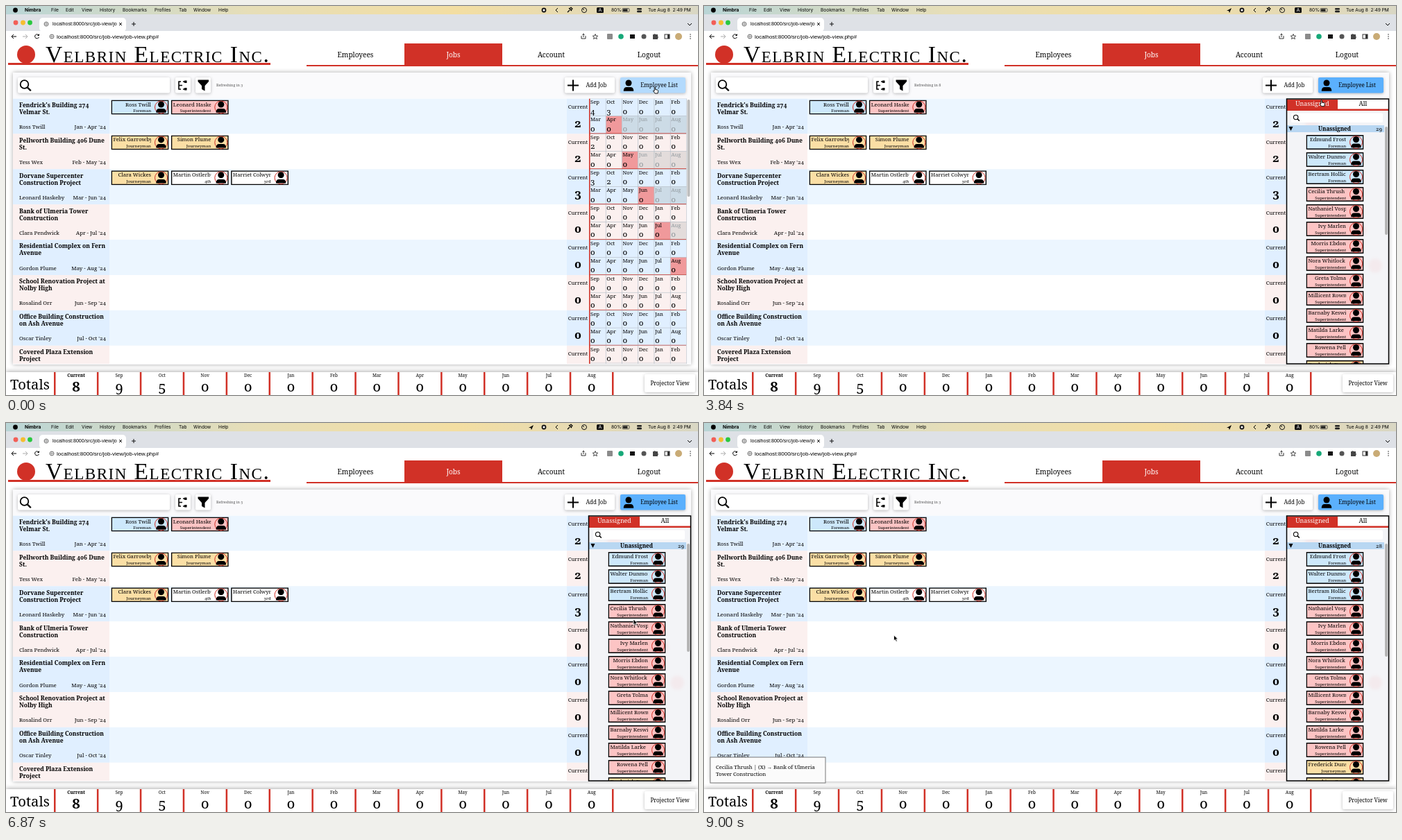
An HTML page that plays this animation: 997x561 px, repeating every 9030 ms.

```html
<!DOCTYPE html>
<html lang="en">
<head>
<meta charset="utf-8">
<title>Job view</title>
<style>
html, body { margin: 0; width: 100%; height: 100%; overflow: hidden; background: #fff; }
#stage { display: block; width: 997px; height: 561px; font-family: "Noto Serif", Georgia, serif; font-variant-numeric: oldstyle-nums; }
text { white-space: pre; }
.ui { font-family: Inter, "Liberation Sans", sans-serif; font-variant-numeric: normal; }
.url { font-family: "Liberation Sans", Arial, sans-serif; font-variant-numeric: normal; }
.soft { filter: drop-shadow(0 1px 2px #0004); }
</style>
</head>
<body>
<svg id="stage" viewBox="0 0 997 561"></svg>
<script>
const LOOP = 9030, RED = '#d13127', TOP = 133.5, PITCH = 50.9;
const MONTHS = 'Sep Oct Nov Dec Jan Feb Mar Apr May Jun Jul Aug'.split(' ');
const ROLE_FILL = { Foreman: '#cde8fb', Superintendent: '#fcc4c4', Journeyman: '#fbdfa5' };

// name lines, manager, dates, current count, last active month, first counts, crew
const JOBS = [
  ["Fendrick's Building 274", 'Velmar St.', 'Ross Twill', "Jan - Apr '24", 2, 7, [4, 3], [['Ross Twill', 'Foreman'], ['Leonard Haskeby', 'Superintendent']]],
  ['Pellworth Building 406 Dune', 'St.', 'Tess Wex', "Feb - May '24", 2, 8, [2], [['Felix Garrowby', 'Journeyman'], ['Simon Plume', 'Journeyman']]],
  ['Dorvane Supercenter', 'Construction Project', 'Leonard Haskeby', "Mar - Jun '24", 3, 9, [3, 2], [['Clara Wickes', 'Journeyman'], ['Martin Ostlerby', '4th'], ['Harriet Colwynd', '3rd']]],
  ['Bank of Ulmeria Tower', 'Construction', 'Clara Pendwick', "Apr - Jul '24", 0, 10, [], []],
  ['Residential Complex on Fern', 'Avenue', 'Gordon Plume', "May - Aug '24", 0, 11, [], []],
  ['School Renovation Project at', 'Nolby High', 'Rosalind Orr', "Jun - Sep '24", 0, 12, [], []],
  ['Office Building Construction', 'on Ash Avenue', 'Oscar Tinley', "Jul - Oct '24", 0, 12, [], []],
  ['Covered Plaza Extension', 'Project', '', '', 0, 12, [], []]
];
const people = (role, names) => names.split(',').map(n => [n, role]);
const FOREMEN = people('Foreman', 'Edmund Frost,Walter Dunmor,Bertram Hollick');
const SUPERS = people('Superintendent', 'Cecilia Thrush,Nathaniel Vosper,Ivy Marlen,Morris Ebdon,Nora Whitlock,Greta Tolma,Millicent Rowntry,Barnaby Keswin,Matilda Larke,Rowena Pell');
const JOURNEYMEN = people('Journeyman', 'Frederick Dunstal,Josephine Gurnell');

const rect = (x, y, w, h, fill, more = '') => `<rect x="${x}" y="${y}" width="${w}" height="${h}" fill="${fill}" ${more}/>`;
const text = (x, y, s, size, more = '') => `<text x="${x}" y="${y}" font-size="${size}" ${more}>${s}</text>`;
const path = (d, more = '') => `<path d="${d}" ${more}/>`;
const circle = (x, y, r, fill, more = '') => `<circle cx="${x}" cy="${y}" r="${r}" fill="${fill}" ${more}/>`;
const group = (id, body) => `<g id="${id}">${body}</g>`;
const MID = 'text-anchor="middle"', END = 'text-anchor="end"', BOLD = 'font-weight="700"';
const line = (w, c = '#000') => `fill="none" stroke="${c}" stroke-width="${w}"`;

const person = (x, y) => `<g transform="translate(${x} ${y})">` +
  circle(0, -3.7, 4.5, '#000') + path('M-7.3 8q0-5.6 4.5-5.6h5.6q4.5 0 4.5 5.6z') + '</g>';
const lens = (x, y, r, w) => circle(x, y, r, 'none', `stroke="#000" stroke-width="${w}"`) +
  path(`M${x + r * .7} ${y + r * .7}l${r * .9} ${r * .9}`, line(w * 1.3));
const box = (x, y, w, h, fill = '#fff', more = '') => rect(x, y, w, h, fill, `rx="2" class="soft" ${more}`);

function card(x, y, [name, role]) {
  const long = name.length > 12;
  return `<svg x="${x}" y="${y}" width="83" height="21">` +
    rect(.75, .75, 81.5, 19.5, ROLE_FILL[role] || '#fff', 'stroke="#000" stroke-width="1.5"') +
    '<svg width="57.5" height="21">' +
    text(long ? 3 : 57.5, 9, name, 7.7, long ? '' : END) + text(57.5, 17.6, role, 6, END) + '</svg>' +
    circle(72, 10.5, 9, 'none', `stroke="${RED}" stroke-width="1"`) + person(72, 10.2) + '</svg>';
}

function browser() {
  const menu = [['File', 65], ['Edit', 86], ['View', 109], ['History', 135], ['Bookmarks', 168], ['Profiles', 214], ['Tab', 249], ['Window', 270], ['Help', 306]];
  const label = (x, s, more = '') => text(x, 8.4, s, 6.6, 'class="ui" ' + more);
  return '<linearGradient id="sky"><stop stop-color="#b9d5d6"/><stop offset=".35" stop-color="#e6deb8"/><stop offset=".65" stop-color="#f3dea2"/><stop offset="1" stop-color="#d9d7c4"/></linearGradient>' +
    rect(0, 0, 997, 12, 'url(#sky)') + circle(13.5, 6, 3.4, '#000') +
    label(27, 'Nimbra', BOLD) + menu.map(([s, x]) => label(x, s)).join('') +
    group('arrow', path('M753 7l7-4-3 7-1-3z')) +
    circle(775, 6, 3.4, '#111') + rect(773.6, 4.6, 2.8, 2.8, '#fff') + path('M795 3l-3 3 3 3', line(1)) +
    path('M809 9l3-3m-1-3l4 4m-3-3l2-2 2 2-2 2z', line(1.2)) +
    circle(833, 6, 3.5, 'none', 'stroke="#111"') + path('M833 6l-2-2', line(1)) +
    rect(851, 2, 10, 8, '#111', 'rx="1.5"') + text(856, 8.4, 'A', 6.5, `class="ui" fill="#fff" ${MID}`) +
    label(872, '80%') + rect(888, 3.5, 10, 5, 'none', 'rx="1.2" stroke="#333" stroke-width=".8"') + rect(889, 4.5, 6.5, 3, '#111') +
    rect(909, 3, 7, 2.6, '#222', 'rx="1.3"') + rect(909, 6.6, 7, 2.6, '#222', 'rx="1.3"') +
    label(925, 'Tue Aug 8  2:49 PM') +
    rect(0, 12, 997, 24, '#dee1e6') + circle(14, 24, 3.4, '#f25f57') + circle(24.5, 24, 3.4, '#f6bd2f') + circle(34.5, 24, 3.4, '#2ac840') +
    rect(48, 17, 125, 20, '#fff', 'rx="5"') +
    circle(58, 26, 3, 'none', 'stroke="#555" stroke-width=".8"') + path('M55 26h6M58 23v6', line(.6, '#555')) +
    text(67, 28.3, 'localhost:8000/src/job-view/jo', 7.1, 'class="url"') +
    path('M163 24l4 4m0-4l-4 4M181 26h6m-3-3v6', line(.9)) + path('M982 25l3 3 3-3', line(1)) +
    rect(0, 36, 997, 17, '#fff') +
    path('M15 44H8m3-3l-3 3 3 3', line(1)) + path('M24 44h7m-3-3l3 3-3 3', line(1, '#aaa')) +
    path('M47 42a3 3 0 1 0 .4 3M47.5 40.5v2h-2', line(1)) +
    circle(66, 44, 3, 'none', 'stroke="#555" stroke-width=".8"') + path('M63 44h6M66 41v6', line(.6, '#555')) +
    text(73, 46.7, 'localhost:8000/src/job-view/job-view.php#', 8, 'class="url"') +
    path('M829 43v4h6v-4m-3 2v-5m-1.5 1.5l1.5-1.5 1.5 1.5', line(.8)) +
    path('M849 40.5l1 2.5 2.7.2-2 1.7.7 2.7-2.4-1.5-2.4 1.5.7-2.7-2-1.7 2.7-.2z', line(.7)) +
    rect(866, 40, 8, 8, '#8b8b8b', 'rx="1"') + circle(886, 44, 3.8, '#16a878') +
    rect(899, 41, 7, 6, '#111') + circle(919, 44, 3.5, '#555') +
    path('M932 41h2q0-2 2 0h3v3q2 1 0 2v2h-7z', 'fill="#444"') +
    rect(949, 41, 7, 6, 'none', 'stroke="#333"') + rect(953, 41, 3, 6, '#333') +
    circle(969, 44, 5, '#c9ab76') + [41, 44, 47].map(y => circle(986, y, .8, '#333')).join('');
}

function header() {
  return circle(29, 70, 13, RED) + rect(3, 82, 378, 3, RED) +
    text(57, 80.5, 'Velbrin Electric Inc.', 33.5, `style="font-family:'Liberation Serif',serif;font-variant-caps:small-caps;letter-spacing:1.5px"`) +
    rect(433, 85, 564, 2, RED) + rect(574, 54, 141, 33, RED) +
    ['Employees', 'Jobs', 'Account', 'Logout'].map((s, i) => text(503.5 + 141 * i, 73.7, s, 10.1, `${MID} fill="${i == 1 ? '#fff' : '#000'}"`)).join('');
}

function toolbar() {
  return rect(10, 96, 977, 421, '#fafafc', 'style="filter:drop-shadow(0 0 3px #0005)"') +
    box(17, 103, 219, 22.5) + lens(26.5, 113, 5.8, 1.8) +
    box(244, 103, 22, 22.5) + path('M252 109h-3v11h3M255 109h5M255 120h5M249 114.5h5', line(1.6)) + rect(257, 107.5, 3.5, 3.5, '#000') + rect(257, 118, 3.5, 3.5, '#000') +
    box(273, 103, 22, 22.5) + path('M276.5 106.5h15.5v2.5l-5.5 6v7.5l-4.5-2.5v-5l-5.5-6z') +
    text(303, 116.3, '', 5.3, 'id="refresh" fill="#555"') +
    box(805, 103, 72, 22.5) + path('M809 114.5h16M817 106.5v16', line(2)) + text(850.5, 117.3, 'Add Job', 8, MID) +
    box(885, 103, 94, 22.5, '#b3dafd', 'id="button"') + person(897, 114.7) + text(941, 117.3, 'Employee List', 8, MID);
}

function monthCell(job, row, k) {
  const [, , , , , last, counts] = job;
  const x = 841 + 23.25 * (k % 6), y = TOP + PITCH * row + (k > 5 ? 25.2 : 0);
  const off = k > last, blue = row % 2 == 0;
  const fill = off ? (blue ? '#ccdbe6' : '#e3dcdb') : k == last ? '#f0999b' : blue ? '#e0efff' : '#fbf0ef';
  const ink = `fill="${off ? '#929a9f' : '#000'}"`;
  return rect(x, y, 23.25, 25.5, fill, 'stroke="#b9c2ca" stroke-width=".6"') +
    text(x + 1, y + 7.7, MONTHS[k], 7.6, ink) + text(x + 1, y + 22, counts[k] || 0, 11.5, ink);
}

function jobs() {
  const at = i => TOP + PITCH * i;
  const base = JOBS.map((job, i) => {
    const y = at(i), edge = i % 2 ? '#fbf0ef' : '#e0efff';
    return rect(10, y, 139, PITCH, edge) + rect(149, y, 659, PITCH, i % 2 ? '#fff' : '#ecf6ff') + rect(808, y, 32, PITCH, edge) +
      text(19, y + 12.3, job[0], 8.5, BOLD) + text(19, y + 22.3, job[1], 8.5, BOLD) +
      text(19, y + 43.4, job[2], 7.8) + text(144, y + 43.4, job[3], 7.8, END) +
      text(824, y + 14.3, 'Current', 7.6, MID) + text(824, y + 41, job[4], 17, `${MID} ${BOLD}`) +
      MONTHS.map((_, k) => monthCell(job, i, k)).join('') + rect(840, y + PITCH - 1, 140, 1.5, RED);
  }).join('');
  const green = JOBS.map((_, i) => rect(149, at(i), 659, PITCH, i % 2 ? '#e1fde2' : '#d1fce6')).join('');
  const crews = JOBS.map((job, i) => job[7].map((p, k) => card(151.5 + 86.3 * k, at(i) + 2, p)).join('')).join('');
  return '<clipPath id="table"><path d="M10 133.5h977v382.5h-977z"/></clipPath><g clip-path="url(#table)">' +
    base + group('green', green) + crews + rect(840, TOP, 1.5, 383, RED) +
    rect(981.5, 135, 4, 140, '#bdbdbd', 'rx="2"') + '</g>';
}

function list(id, title, count, members, bar) {
  return group(id, text(908.5, 179.8, title, 8.1, `${MID} ${BOLD}`) + text(977, 179.8, count, 7.8, END) +
    members.map((p, i) => card(867.5, 186 + 25 * i, p)).join('') + rect(981, 174, 4, bar, '#b5b5b5', 'rx="2"'));
}

function panel() {
  const free = [...FOREMEN, ...SUPERS, ...JOURNEYMEN];
  const all = [FOREMEN[0], JOBS[0][7][0], ...FOREMEN.slice(1), ...SUPERS.slice(0, 8), JOBS[0][7][1], ...SUPERS.slice(8)];
  const glow = [0, 1, 2, 3, 4].map(i => circle(876 + 22.8 * i, 171 + PITCH * i, 10, '#ff5a5a', 'opacity=".06"')).join('');
  return '<clipPath id="drawer"><path d="M839 133h149v383h-149z"/></clipPath>' + group('panel',
    '<g clip-path="url(#drawer)">' + rect(839, 133.5, 148, 383, '#f3f4f7') + `<g style="filter:blur(2px)">${glow}</g>` +
    rect(840, 135, 73, 14, RED) + rect(913, 135, 73, 14, '#fff') + rect(840, 148.5, 146, 2.5, RED) +
    text(876.5, 144.2, 'Unassigned', 8.9, `${MID} fill="#fff"`) + text(949.5, 144.2, 'All', 8.9, MID) +
    rect(846, 154.5, 132, 13.5, '#fff', 'rx="2"') + lens(852.7, 160.5, 3.2, 1.1) +
    rect(840, 172, 140, 10, '#b8d7f2') + path('M842.5 174h6l-3 6z') +
    list('all', 'Active', 37, all, 110) + list('free', 'Unassigned', 29, free, 156) +
    list('after', 'Unassigned', 28, free.filter(p => p != SUPERS[0]), 163) +
    group('grab', rect(867.5, 261, 83, 21, '#e03030', 'opacity=".22"')) + '</g>' +
    rect(839.5, 134, 147, 382, 'none', 'stroke="#000" stroke-width="1.5"'));
}

function footer() {
  const totals = [8, 9, 5];
  return rect(0, 528, 997, 34, '#fff', 'style="filter:drop-shadow(0 -1px 3px #0005)"') + text(6, 553.3, 'Totals', 20.2) +
    ['Current', ...MONTHS].map((m, i) => {
      const x = 101 + 61.9 * i, b = `${MID} ${i ? '' : BOLD}`;
      return rect(69 + 61.9 * i, 528, 2.5, 33, RED) + text(x, 535.2, m, 6.4, b) + text(x, 555.7, totals[i] || 0, 20.5, b);
    }).join('') + rect(873, 528, 2.5, 33, RED) +
    box(920, 531, 73, 26) + text(956.5, 547.3, 'Projector View', 8, MID);
}

const toast = () => group('toast', rect(9, 482, 166, 37, '#fbfbfb', 'stroke="#777" stroke-width="1"') +
  text(17, 498.7, 'Cecilia Thrush | (X) → Bank of Ulmeria', 7.7) + text(17, 508.7, 'Tower Construction', 7.7));
const status = () => group('status', rect(-3, 550.5, 335, 14, '#e4e6e9', 'rx="2" stroke="#b5b8bb" stroke-width=".8"') +
  text(2, 558, 'localhost:8000/src/job-view/job-view.php#', 6.9, 'class="url" fill="#444"'));
const cursor = () => group('cursor',
  group('pointer', path('M0 0v8l1.9-1.7 1.4 3 1.5-.7-1.4-2.9h2.6z', 'fill="#000" stroke="#fff" stroke-width=".8"')) +
  group('hand', path('M-.8.5q.8-1 1.5 0v3l3 .6q1 .3.9 1.4l-.6 3.5h-4l-2.6-3.5q0-1 1.8 0z', 'fill="#fff" stroke="#000" stroke-width=".9"')));

const stage = document.getElementById('stage');
stage.innerHTML = rect(0, 0, 997, 561, '#fff') + browser() + header() + toolbar() + jobs() + panel() + footer() + toast() + status() + cursor();
const $ = id => document.getElementById(id);
const show = (id, on) => { $(id).style.display = on ? '' : 'none'; };

// time, x, y of the cursor tip
const TRAIL = [[0, 935, 117], [1200, 935, 117], [1650, 946, 142], [2050, 946, 142], [2400, 871, 144], [3500, 871, 144],
  [4400, 929, 118], [5950, 929, 118], [6700, 904, 283], [6950, 904, 283], [7200, 898, 270], [7400, 898, 270],
  [8350, 272, 308], [8700, 272, 308], [8900, 273.5, 306], [LOOP, 273.5, 306]];

function spot(t) {
  const i = TRAIL.findIndex(p => p[0] > t), [t0, x0, y0] = TRAIL[i - 1], [t1, x1, y1] = TRAIL[i];
  const u = (t - t0) / (t1 - t0), e = u * u * (3 - 2 * u);
  return [x0 + (x1 - x0) * e, y0 + (y1 - y0) * e];
}

function draw(t) {
  const within = (a, b) => t >= a && t < b;
  const open = t >= 500 && !within(4900, 5800), all = within(1900, 2650), drag = within(7300, 8800), done = t >= 8800;
  const left = t < 500 ? 3 : t < 1500 ? 2 : 10 - Math.floor((t - 1500) / 1000);
  const [x, y] = spot(t), hand = y < 152;
  show('panel', open);
  show('all', all);
  show('free', !all && !done);
  show('after', done);
  show('grab', drag);
  show('green', drag);
  show('toast', done);
  show('status', within(1750, 3650));
  show('arrow', t >= 1500);
  show('hand', hand);
  show('pointer', !hand);
  $('button').setAttribute('fill', open ? '#5bb0fd' : '#b3dafd');
  $('refresh').textContent = 'Refreshing in ' + left;
  $('cursor').setAttribute('transform', `translate(${x} ${y})`);
}

function tick() {
  draw(performance.now() % LOOP);
  requestAnimationFrame(tick);
}
tick();
</script>
</body>
</html>
```
